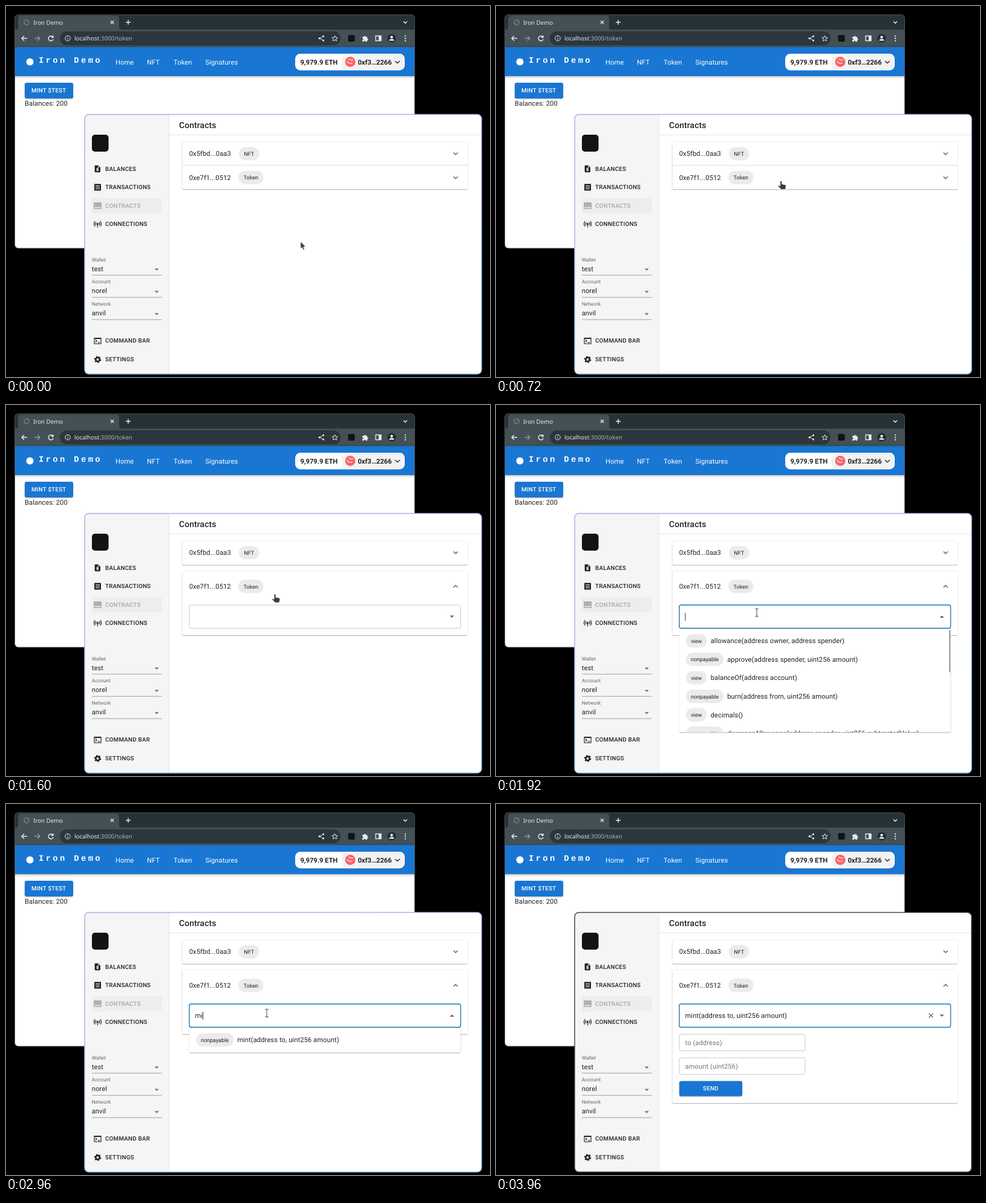
Write an HTML page that moves like this. It is 800 px wide and 614 px high and loops after 8000 ms.

```html
<!DOCTYPE html>
<html lang="en">
<head>
<meta charset="utf-8">
<title>Contracts demo</title>
<style>
  html, body { margin: 0; width: 100%; height: 100%; overflow: hidden; background: #000; }
  svg { display: block; width: 100vw; height: 100vh; }
  text { font-family: Roboto, sans-serif; fill: #212121; text-rendering: geometricPrecision; white-space: pre; }
  .body { font-size: 11.11px; letter-spacing: .00938em; }
  .small { font-size: 8.33px; letter-spacing: .00938em; fill: #666; }
  .chip { font-size: 9.03px; text-anchor: middle; }
  .button { font-size: 9.72px; font-weight: 500; letter-spacing: .02857em; }
  .title { font-size: 13.9px; font-weight: 500; letter-spacing: .0075em; }
  .bold { font-size: 11.11px; font-weight: 700; }
  .chrome { font-family: "Noto Sans", sans-serif; font-size: 9.75px; fill: #e8eaec; }
  .brand { font-family: "Liberation Mono", monospace; font-size: 13.9px; font-weight: 700; letter-spacing: 3.33px; }
  .white { fill: #fff; }
  .hint { fill: #757575; }
  .off { fill: #a8a8a8; }
  .line { fill: none; stroke-width: 1.4; }
  .paper { fill: #fff; filter: drop-shadow(0 1px .7px rgba(0,0,0,.24)) drop-shadow(0 .4px 1.2px rgba(0,0,0,.16)); }
  .field { fill: #fff; stroke: #c4c4c4; stroke-width: .9; }
</style>
</head>
<body>
<svg viewBox="0 0 800 614">
  <defs>
    <clipPath id="browserClip"><rect x="14.5" y="14.5" width="661" height="386.500" rx="6"/></clipPath>
    <clipPath id="walletClip"><rect x="130" y="179.500" width="656" height="429.500" rx="7"/></clipPath>
    <clipPath id="cardClip"><rect id="cardClipBox" x="285" width="484"/></clipPath>
    <clipPath id="listClip"><rect x="303" y="371" width="449" height="170.500"/></clipPath>
    <linearGradient id="glow" x1="0" y1="0" x2=".25" y2="1">
      <stop stop-color="#b9a8ec"/><stop offset="1" stop-color="#8fc3f2"/>
    </linearGradient>
  </defs>

  <g clip-path="url(#browserClip)">
    <path fill="#fff" d="M14 14h663v388H14z"/>
    <path fill="#263238" d="M14 14h663v26H14z"/>
    <path fill="#435056" d="M14 39h2q4 0 4-4V21q0-5 5-5h157q5 0 5 5v14q0 4 4 4h486v29H14z"/>
    <rect x="89" y="42" width="464" height="23" rx="11.5" fill="#2b373c"/>
    <path fill="#1976d2" style="filter:drop-shadow(0 1.5px 2px rgba(0,0,0,.35))" d="M10 68h670v48H10z"/>
    <g class="line" stroke="#e8eaec">
      <circle cx="34" cy="27" r="4.300" stroke="#6f7b80" fill="#566267"/>
      <path stroke="#374348" d="M31 25q3 0 3 2t3 2"/>
      <path d="M173 24.500l5 5m0-5l-5 5M198 27h8m-4-4v8M657 25.500l3 3 3-3"/>
      <path d="M35 53.500h-9m4-4l-4 4 4 4"/>
      <path stroke="#8b979c" d="M47 53.500h9m-4-4l4 4-4 4"/>
      <path d="M77.500 51.500a4 4 0 1 0 .5 3.500m0-6v3h-3"/>
      <path stroke-width="1" d="M102 53v3m0-5.500v1.200"/><circle cx="102" cy="53.500" r="4.300" stroke-width="1"/>
      <path stroke-width="1" d="M524.500 50l-6 3.500 6 3.500"/>
      <path stroke-width="1" d="M543.500 49l1.300 3.100 3.400.3-2.600 2.200.8 3.300-2.900-1.800-2.900 1.800.8-3.300-2.600-2.200 3.400-.3z"/>
      <path stroke-width="1.300" d="M611 49.500h9v8h-9z"/>
    </g>
    <g fill="#e8eaec">
      <circle cx="524.500" cy="50" r="1.500"/><circle cx="518" cy="53.500" r="1.500"/><circle cx="524.500" cy="57" r="1.500"/>
      <path d="M589 51h2.500a1.600 1.600 0 0 1 3.200 0H597v2.500a1.600 1.600 0 0 1 0 3.200V59h-2.500a1.500 1.500 0 0 0-3 0H589v-2.500a1.500 1.500 0 0 0 0-3zM616 49.500h4v8h-4z"/>
      <circle cx="637.500" cy="53.500" r="7" fill="#202b30"/>
      <circle cx="637.500" cy="51.500" r="2.200"/><path d="M633.300 57.500q0-3 4.200-3t4.200 3z"/>
      <circle cx="660" cy="49.700" r="1.150"/><circle cx="660" cy="53.700" r="1.150"/><circle cx="660" cy="57.700" r="1.150"/>
    </g>
    <rect x="565.500" y="48" width="11" height="11" rx="2" fill="#121212"/>
    <circle cx="39.500" cy="92.500" r="6" fill="#fff"/>
    <rect x="478" y="79" width="181" height="27.500" rx="8.300" fill="#fff"/>
    <rect x="555" y="80.500" width="102.500" height="24.500" rx="7" fill="#f2f2f3"/>
    <circle cx="569" cy="92.500" r="8.500" fill="#fc6467"/>
    <path class="line" stroke="#ffd9d6" d="M563.500 91.500q3 4.500 9 3m-6-7q3 3 7 1.500"/>
    <path class="line" stroke="#25292e" stroke-width="1.700" d="M643 91l4 3.500 4-3.500"/>
    <rect x="31" y="127" width="80" height="26" rx="3" fill="#1976d2" style="filter:drop-shadow(0 1px 1px rgba(0,0,0,.3))"/>
    <g id="browserText"></g>
  </g>
  <rect x="14.500" y="14.500" width="661" height="386.500" rx="6" fill="none" stroke="#4a4f52"/>

  <g clip-path="url(#walletClip)">
    <path fill="#fff" d="M130 179h657v431H130z"/>
    <path fill="#f5f5f5" d="M130 179h139v431H130z"/>
    <path class="line" stroke="#e0e0e0" stroke-width=".8" style="stroke-width:.8" d="M269.300 179v431M269.500 213.400h517"/>
    <rect x="142" y="213" width="27.500" height="28" rx="5" fill="#111413"/>
    <rect x="142" y="318" width="115.500" height="25" rx="3" fill="#ededed"/>
    <g fill="#212121">
      <path transform="translate(144.300 262.500) scale(.58)" fill-rule="evenodd" d="M14 2H6Q4 2 4 4v16q0 2 2 2h12q2 0 2-2V8zM15 12h-4v1h3q1 0 1 1v3q0 1-1 1h-1v1h-2v-1H9v-2h4v-1h-3q-1 0-1-1v-3q0-1 1-1h1V9h2v1h2zM13 8V3.500L17.500 8z"/>
      <path fill-rule="evenodd" d="M146 294.500h11v11h-11zM148 297v1h7v-1zm0 2.500v1h7v-1zm0 2.500v1h7v-1z"/>
      <path fill="#b0b0b0" fill-rule="evenodd" d="M146 325h11q1 0 1 1v9q0 1-1 1h-11q-1 0-1-1v-9q0-1 1-1zM146.200 332.800v1.500h10.600v-1.500z"/>
      <circle cx="151.500" cy="360.500" r="1.600"/>
    </g>
    <g class="line" stroke="#212121" style="stroke-width:1.150">
      <path d="M151.500 361v5.500M149 357.800q-2 2.700 0 5.400m5-5.400q2 2.700 0 5.400M147 356q-3 4.500 0 9m9-9q3 4.500 0 9"/>
      <path d="M146 549.500h11v9.500h-11zm0 1h11M148 552.500l2 2-2 2m4 .3h3"/>
      <circle cx="151.500" cy="585" r="3.200" style="stroke-width:2.500"/>
      <circle cx="151.500" cy="585" r="4.900" pathLength="48" stroke-dasharray="4 4" style="stroke-width:1.900"/>
    </g>
    <g id="sideText"></g>

    <rect class="paper" x="291.500" y="225" width="471.500" height="39.500" rx="2"/>
    <path class="line" stroke="#616161" d="M739.700 242.500l3.500 3.500 3.500-3.500"/>
    <g id="firstRow"></g>

    <rect id="card" class="paper" x="291.500" width="471.500" rx="2"/>
    <path id="divider" class="line" stroke="#dedede" style="stroke-width:.8" d="M291.500 263.800h471.500"/>
    <g id="secondRow"><path id="chevron" class="line" stroke="#616161" d="M-3.500-1.800l3.500 3.500 3.500-3.500"/></g>
    <g clip-path="url(#cardClip)">
      <g id="content">
        <rect id="select" class="field" x="303" y="331" width="448.500" height="38.500" rx="3"/>
        <path id="selectArrow" fill="#616161" d="M-3.600-1.700h7.200l-3.600 3.500z"/>
        <text id="query" class="body" x="312.500" y="354.200"></text>
        <path id="caret" stroke="#212121" stroke-width=".9" d="M0 344v13"/>
        <g id="form">
          <path class="line" stroke="#616161" style="stroke-width:1.100" d="M715.300 346.500l7 7m0-7l-7 7"/>
          <rect class="field" x="303" y="381" width="208" height="27.500" rx="3"/>
          <rect class="field" x="303" y="420" width="208" height="27.500" rx="3"/>
          <rect x="303" y="458.500" width="104" height="25" rx="3" fill="#1976d2" style="filter:drop-shadow(0 1px 1px rgba(0,0,0,.3))"/>
        </g>
      </g>
    </g>
    <g id="lists"></g>
  </g>
  <rect id="frame" x="130" y="179.500" width="656" height="429.500" rx="7" fill="none" stroke-width="1.500"/>

  <g id="pointer" fill="#3c3c3c" stroke="#fff" stroke-width=".5">
    <path id="arrow" d="M0 0v11.500l2.600-2 1.800 4 2-.9-1.800-3.800 3.400-.4z"/>
    <path id="hand" d="M-1.300 1.200a1.300 1.300 0 0 1 2.600 0v4l5.700 1.200q1.500.5 1.200 2l-1 5.600H.8L-4.600 9q-.6-1.600 1.300-1.500l2 1.200z"/>
    <path id="beam" fill="none" stroke="#555" stroke-width="1.100" d="M-2.800-6.500q2.800 0 2.800 1.300v10.400q0 1.300 2.800 1.300M2.800-6.500q-2.800 0-2.800 1.300m0 10.400q0 1.300-2.800 1.300"/>
  </g>
</svg>

<script>
const LOOP = 8000;
const $ = id => document.getElementById(id);

function add(parent, tag, attrs, content = '') {
  const el = document.createElementNS('http://www.w3.org/2000/svg', tag);
  for (const key in attrs) el.setAttribute(key, attrs[key]);
  el.textContent = content;
  parent.append(el);
  return el;
}

const SIZE = { body: 11.11, small: 8.33, chip: 9.03, button: 9.72, title: 13.9, bold: 11.11, chrome: 9.75, brand: 12 };

// y is the middle of the capitals
function label(parent, x, y, cls, content) {
  return add(parent, 'text', { x, y: y + SIZE[cls.split(' ')[0]] * .355, class: cls }, content);
}

function chip(parent, x, y, width, content) {
  add(parent, 'rect', { x, y: y - 11.1, width, height: 22.2, rx: 11.1, fill: '#ebebeb' });
  label(parent, x + width / 2, y + .3, 'chip', content);
}

const browser = $('browserText');
label(browser, 45, 27.2, 'chrome', 'Iron Demo');
const url = label(browser, 113, 53.7, 'chrome', 'localhost');
add(url, 'tspan', { fill: '#a9b2b6' }, ':3000/token');
label(browser, 54, 90, 'brand white', 'Iron Demo');
[[181, 'Home'], [233, 'NFT'], [277, 'Token'], [329.5, 'Signatures']]
  .forEach(([x, name]) => label(browser, x, 92.8, 'body white', name));
label(browser, 486.5, 93, 'bold', '9,979.9 ETH');
label(browser, 581.5, 93, 'bold', '0xf3…2266');
label(browser, 42, 140, 'button white', 'MINT $TEST');
label(browser, 31, 161.5, 'body', 'Balances: 200');

const side = $('sideText');
label(side, 286, 197, 'title', 'Contracts');
[[269.3, 'BALANCES'], [300, 'TRANSACTIONS'], [330.5, 'CONTRACTS'], [361, 'CONNECTIONS'], [554, 'COMMAND BAR'], [584.7, 'SETTINGS']]
  .forEach(([y, name]) => label(side, 164, y, name === 'CONTRACTS' ? 'button off' : 'button', name));
[['Wallet', 'test'], ['Account', 'norel'], ['Network', 'anvil']].forEach(([name, value], i) => {
  const y = 419.7 + i * 36.8;
  label(side, 141.7, y, 'small', name);
  label(side, 141.7, y + 15, 'body', value);
  add(side, 'path', { d: `M142 ${y + 25.7}h115.500`, stroke: '#8c8c8c', 'stroke-width': .8 });
  add(side, 'path', { d: `M245.500 ${y + 14.9}h7.200l-3.600 3.500z`, fill: '#757575' });
});

label($('firstRow'), 302.7, 244.3, 'body', '0x5fbd...0aa3');
chip($('firstRow'), 385, 244.500, 33.5, 'NFT');
label($('secondRow'), 302.7, 0, 'body', '0xe7f1...0512');
chip($('secondRow'), 384, .2, 41.5, 'Token');
label($('form'), 312.5, 394.8, 'body hint', 'to (address)');
label($('form'), 312.5, 433.8, 'body hint', 'amount (uint256)');
label($('form'), 342, 471, 'button white', 'SEND');

const FUNCTIONS = [
  'view allowance(address owner, address spender)',
  'nonpayable approve(address spender, uint256 amount)',
  'view balanceOf(address account)',
  'nonpayable burn(address from, uint256 amount)',
  'view decimals()',
  'nonpayable decreaseAllowance(address spender, uint256 subtractedValue)',
  'nonpayable increaseAllowance(address spender, uint256 addedValue)',
  'nonpayable mint(address to, uint256 amount)',
  'view name()',
  'view symbol()',
  'view totalSupply()',
  'nonpayable transfer(address to, uint256 amount)',
  'nonpayable transferFrom(address from, address to, uint256 amount)'
].map(line => [line.split(' ')[0], line.slice(line.indexOf(' ') + 1)]);

const ROW = 30.55;
function buildList(query) {
  const found = FUNCTIONS.filter(([, signature]) => signature.includes(query));
  const full = found.length * ROW + 10, height = Math.min(full, 170.5);
  const list = add($('lists'), 'g', {});
  add(list, 'rect', { class: 'paper', x: 303, y: 371, width: 448.5, height, rx: 2 });
  list.hover = add(list, 'rect', { x: 303, y: 375, width: 448.5, height: ROW, fill: '#f5f5f5' });
  const rows = add(list, 'g', { 'clip-path': 'url(#listClip)' });
  found.slice(0, 6).forEach(([kind, signature], i) => {
    const y = 390.4 + i * ROW, width = kind === 'view' ? 34.5 : 62;
    chip(rows, 314, y, width, kind);
    label(rows, 320.2 + width, y, 'body', signature);
  });
  if (full > height) add(list, 'rect', { x: 749, y: 372.5, width: 1.7, height: height * 167 / full, fill: '#8a8a8a' });
  return list;
}
const lists = { '': buildList(''), m: buildList('m'), mi: buildList('mi') };

// time, x, y of the pointer
const PATH = [
  [240, 487, 390], [720, 471, 289.5], [920, 465, 286], [1440, 465, 286], [1600, 444.5, 313], [1800, 431, 343.5],
  [2920, 431, 343.5], [2960, 431, 346], [3240, 430.5, 391], [3670, 430.5, 391], [3950, 815, 384]
];
const SELECTED = 'mint(address to, uint256 amount)';
const OPENED = 1360, FOCUSED = 1840, LISTED = 1880, PICKED = 3360, LEFT = 3960;

const clamp = v => Math.min(1, Math.max(0, v));
const ease = v => (1 - Math.cos(Math.PI * clamp(v))) / 2;
const show = (el, on) => { el.style.display = on ? '' : 'none'; };

function pointerAt(t) {
  const i = PATH.findIndex(step => t < step[0]);
  if (i <= 0) return PATH[i ? PATH.length - 1 : 0].slice(1);
  const [t0, x0, y0] = PATH[i - 1], [t1, x1, y1] = PATH[i];
  const k = ease((t - t0) / (t1 - t0));
  return [x0 + (x1 - x0) * k, y0 + (y1 - y0) * k];
}

function pointerShape(t, x, y) {
  if (t < OPENED) return y < 303 ? 'hand' : 'arrow';
  if (t < 3670) return y > 331 && y < 370 ? 'beam' : 'hand';
  return x < 511 ? 'beam' : 'arrow';
}

function draw(t) {
  const open = ease((t - OPENED + 30) / 250);
  const grow = ease((t - PICKED + 20) / 60);
  const top = 264 + 11 * open, head = 39.3 + 10.7 * open;
  const height = head + 56 * open + 114 * grow;
  for (const box of [$('card'), $('cardClipBox')]) {
    box.setAttribute('y', top);
    box.setAttribute('height', height);
  }
  $('divider').style.opacity = 1 - open;
  $('secondRow').setAttribute('transform', `translate(0 ${top + head / 2})`);
  $('chevron').setAttribute('transform', `translate(743.200 .300) rotate(${180 * open})`);
  $('content').setAttribute('transform', `translate(0 ${top + head - 325})`);
  show($('content'), open > 0);

  const focused = t >= FOCUSED, picked = t >= PICKED;
  const listed = t >= LISTED && !picked;
  const typed = t < 2400 ? '' : t < 2960 ? 'm' : 'mi';
  $('select').style.stroke = focused ? '#1976b8' : '';
  $('select').style.strokeWidth = focused ? 1.4 : '';
  $('selectArrow').setAttribute('transform', `translate(737 350.300) rotate(${listed ? 180 : 0})`);
  $('query').textContent = picked ? SELECTED : typed;
  const end = $('query').textContent ? $('query').getComputedTextLength() : 0;
  $('caret').setAttribute('transform', `translate(${312.9 + end} 0)`);
  show($('caret'), focused && t < LEFT);
  show($('form'), picked);

  const [x, y] = pointerAt(t), shape = pointerShape(t, x, y);
  for (const key in lists) {
    show(lists[key], listed && key === typed);
    show(lists[key].hover, y > 375);
  }
  $('pointer').setAttribute('transform', `translate(${x} ${y})`);
  show($('pointer'), t < LEFT);
  for (const id of ['arrow', 'hand', 'beam']) show($(id), id === shape);
  $('frame').setAttribute('stroke', t < LEFT ? 'url(#glow)' : '#45494c');
}

function tick() {
  draw(performance.now() % LOOP);
  requestAnimationFrame(tick);
}
tick();
</script>
</body>
</html>
```
